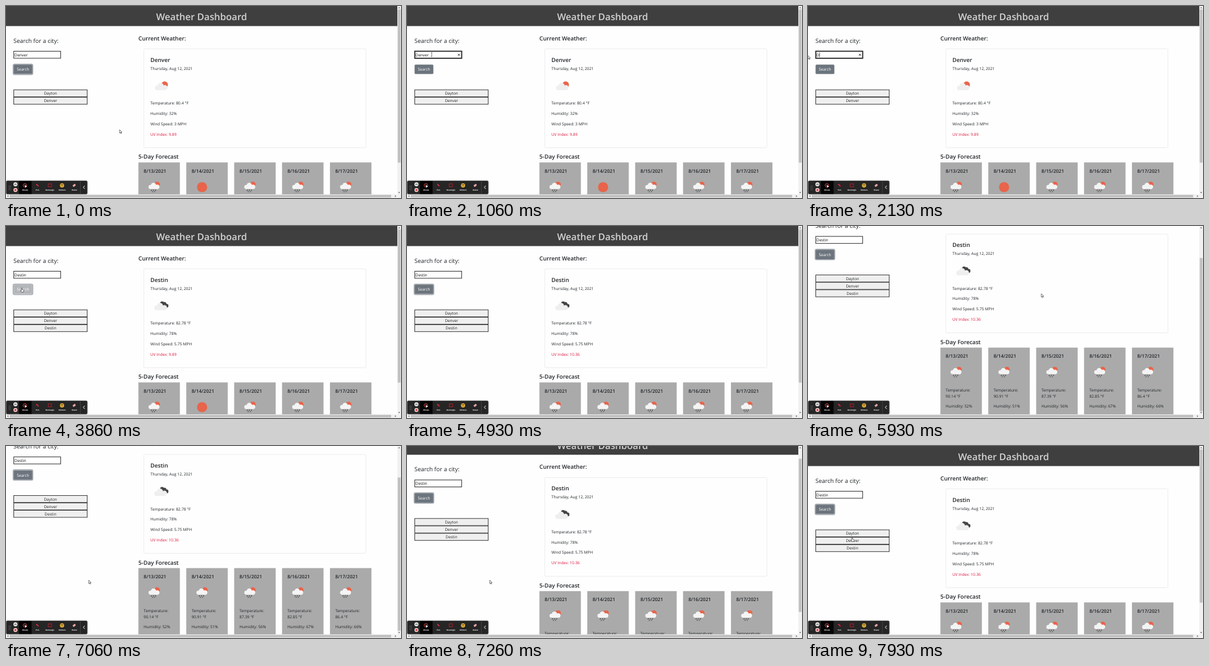
Animation, 640 px wide and 312 px high, one loop 8 s. Source, as an HTML page:

```html
<!DOCTYPE html>
<html lang="en">
<head>
<meta charset="utf-8">
<title>Weather Dashboard</title>
<style>
  html, body { margin: 0; width: 100%; height: 100%; overflow: hidden; background: #fefefe; }
  svg { display: block; width: 100%; height: 100%; }
  text {
    font: 400 6.35px "Open Sans", "Noto Sans", sans-serif;
    fill: #212529;
    text-rendering: geometricPrecision;
    white-space: pre;
  }
  .title { font-size: 15.25px; font-weight: 600; fill: #d3d3d3; }
  .head { font-size: 9.2px; font-weight: 600; }
  .label { font-size: 9.5px; }
  .day { font-size: 7.67px; font-weight: 600; }
  .mid { text-anchor: middle; }
  .uv { fill: #dc143c; }
  .tool { font-size: 2.9px; font-weight: 700; fill: #fff; text-anchor: middle; }
  .city { fill: #efefef; stroke: #2a2a2a; stroke-width: .9; }
  .arrowhead { fill: #505050; }
  .pointer { fill: #fff; stroke: #222; stroke-width: .6; stroke-linejoin: round; }
</style>
</head>
<body>
<svg viewBox="0 0 640 312" preserveAspectRatio="none">
  <defs>
    <g id="cloud">
      <circle cx="4" cy="9" r="3.8"/>
      <circle cx="9.5" cy="6" r="5"/>
      <circle cx="16.6" cy="8.6" r="4.2"/>
      <rect x="4" y="6.5" width="13" height="6.3"/>
    </g>
    <g id="partly">
      <circle cx="257" cy="128" r="5.4" fill="#e9654a"/>
      <use href="#cloud" x="241" y="124" fill="#efefef"/>
    </g>
    <g id="overcast">
      <g fill="#454547">
        <circle cx="253" cy="125.6" r="3.2"/>
        <circle cx="256.5" cy="127" r="3.4"/>
        <circle cx="260" cy="129.6" r="3.2"/>
        <rect x="252" y="127" width="8" height="5.8"/>
      </g>
      <use href="#cloud" x="240" y="124" fill="#efefef"/>
    </g>
    <g id="rain">
      <circle cx="4.6" cy="-4" r="4.6" fill="#e8644a"/>
      <use href="#cloud" transform="translate(-9.3 -7.6) scale(.86)" fill="#f4f4f4"/>
      <path d="M-3.8 4.4l-1.2 2M-.4 4.4l-1.2 2M3 4.4l-1.2 2M-2.4 7l-.8 1.4M1 7l-.8 1.4" stroke="#47474a" stroke-width="1.1" fill="none"/>
    </g>
    <circle id="sun" cx="0" cy=".4" r="8.2" fill="#e8644a"/>
  </defs>

  <g id="page">
    <rect width="634" height="32.6" fill="#3f3f3f"/>
    <text class="title mid" x="316.8" y="23">Weather Dashboard</text>

    <text class="label" x="12" y="59.6">Search for a city:</text>
    <rect id="field" x="12.6" y="73.5" width="76" height="11.4" fill="#fff" stroke="#333"/>
    <rect id="mark" y="75.4" height="7.8" fill="#3390ff"/>
    <text id="query" x="13.8" y="81.7"></text>
    <path id="caret" d="M0 75.6v7.6" stroke="#000" stroke-width=".6"/>
    <path id="clear" d="M82.6 77.8l3 3m0-3l-3 3" stroke="#222" stroke-width="1"/>

    <rect id="ring" x="11.6" y="94.4" width="31.8" height="17" rx="2.2" fill="none" stroke="#a4a9ae" stroke-width="1.5"/>
    <rect id="button" x="12.3" y="95.2" width="30.4" height="15.4" rx="1.6"/>
    <text class="mid" x="27.5" y="105.3" style="fill:#fff">Search</text>
    <g id="cities"></g>

    <text class="head" x="214.6" y="55.6">Current Weather:</text>
    <rect x="223.3" y="69.7" width="359.8" height="160.5" rx="1.7" fill="none" stroke="#e9e9e9" stroke-width=".8"/>
    <text id="name" class="head" x="234" y="90.8"></text>
    <text x="234" y="103.8">Thursday, Aug 12, 2021</text>
    <use id="sky"/>
    <text id="temp" x="234" y="160.4"></text>
    <text id="humid" x="234" y="177.1"></text>
    <text id="wind" x="234" y="193.8"></text>
    <text id="uv" class="uv" x="234" y="210.5"></text>

    <text class="head" x="214.6" y="248.4">5-Day Forecast</text>
    <g id="days"></g>
  </g>

  <!-- scrollbars -->
  <rect x="634" width="6" height="312" fill="#f1f1f1"/>
  <rect y="306" width="640" height="6" fill="#f1f1f1"/>
  <rect id="thumb" x="634.7" width="4.6" height="249" fill="#c1c1c1"/>
  <rect x="6" y="306.8" width="618" height="4.5" fill="#c1c1c1"/>
  <path class="arrowhead" d="M635.5 3.6h3l-1.5-1.8zM635.5 302.4h3l-1.5 1.8zM3.8 307.6v3l-1.8-1.5zM630.4 307.6v3l1.8-1.5z"/>

  <!-- recorder bar -->
  <rect x=".4" y="284" width="131.4" height="21.8" rx="2" fill="#262626" stroke="#4a4a4a" stroke-width=".6"/>
  <path d="M5 292v7M7 292v7" stroke="#777" stroke-width=".9" stroke-dasharray="1 1"/>
  <circle cx="15.3" cy="289.8" r="3.2" fill="#fff"/>
  <path d="M14.3 288.3v3M16.3 288.3v3" stroke="#222" stroke-width=".9"/>
  <circle cx="15.3" cy="299" r="3.2" fill="#f3d9d9"/>
  <rect x="13.7" y="297.4" width="3.2" height="3.2" rx=".5" fill="#d83a3a"/>
  <rect x="21" y="284.4" width="20.5" height="21" fill="#050505"/>
  <circle cx="30.6" cy="291.4" r="2.8" fill="none" stroke="#e04848" stroke-width="1"/>
  <path d="M30.2 290.4l4 3.2-1.9.3-.9 1.7z" fill="#fff"/>
  <path d="M49 289.4l3.6 3.4" stroke="#d92b3a" stroke-width="1.8"/>
  <rect x="68.4" y="289" width="5.4" height="4.8" fill="none" stroke="#a81f2b" stroke-width="1"/>
  <circle cx="90.8" cy="291.6" r="3.4" fill="#f2bd3c"/>
  <path d="M88.6 290.6h4.4" stroke="#5b3a10" stroke-width="1.1"/>
  <path d="M89.3 292.6q1.5 1.6 3 0" stroke="#5b3a10" stroke-width=".7" fill="none"/>
  <path d="M108.6 293l3.8-3" stroke="#e8a3a8" stroke-width="3"/>
  <g id="tools"></g>
  <path d="M120.6 285v20" stroke="#555" stroke-width=".6"/>
  <path d="M127.6 292l-2.4 2.6 2.4 2.6" stroke="#fff" stroke-width="1" fill="none"/>

  <g id="cursor">
    <path id="arrow" class="pointer" d="M0 0v5.6l1.3-1.2.9 2 .9-.4-.9-1.9h1.8z"/>
    <path id="hand" class="pointer" d="M-.6 0q.6-.7 1.2 0v2.2l2.2.6q.6.2.5.9l-.5 2.6h-3.2l-1.8-2.4q.2-.8 1.6.2z"/>
    <path id="beam" d="M-1-3h2M0-3v6M-1 3h2" stroke="#222" stroke-width=".6" fill="none"/>
  </g>
</svg>

<script>
const LOOP = 8000;
const $ = id => document.getElementById(id);
const show = (id, on) => $(id).setAttribute("visibility", on ? "visible" : "hidden");
const set = (id, attr, value) => $(id).setAttribute(attr, value);
const write = (id, text) => { if ($(id).textContent !== text) $(id).textContent = text; };

const reports = {
  Denver: { sky: "#partly", temp: "80.4", humid: 32, wind: "3" },
  Destin: { sky: "#overcast", temp: "82.78", humid: 78, wind: "5.75" }
};
const forecast = [["90.14", 52], ["90.91", 51], ["87.39", 56], ["82.85", 67], ["86.4", 66]];

$("cities").innerHTML = ["Dayton", "Denver", "Destin"].map((city, i) => `
  <g id="city${i}" transform="translate(0 ${i * 12.05})">
    <rect class="city" x="12.6" y="136.2" width="119" height="11.4"/>
    <text class="mid" x="72.1" y="144.4">${city}</text>
  </g>`).join("");

$("days").innerHTML = forecast.map(([temp, humid], i) => `
  <g transform="translate(${214.5 + i * 77.6} 0)">
    <rect y="254.2" width="67.2" height="130" fill="#aaa"/>
    <text class="day" x="8.6" y="270.6">8/${13 + i}/2021</text>
    <use id="icon${i}" href="#rain" x="25.6" y="294"/>
    <text x="8.6" y="325.4">Temperature:</text>
    <text x="8.6" y="335.3">${temp} °F</text>
    <text x="8.6" y="352">Humidity: ${humid}%</text>
  </g>`).join("");

$("tools").innerHTML = ["Mouse", "Pen", "Rectangle", "Stickers", "Eraser"].map((name, i) =>
  `<text class="tool" x="${31 + i * 20}" y="300.2">${name}</text>`).join("");

// time, x, y of the pointer
const path = [
  [0, 184, 201], [60, 184, 201], [800, 40, 79], [1060, 40, 79], [1400, 0, 80.5],
  [3260, 0, 80.5], [3600, 25.5, 101], [4260, 25.5, 101], [4800, 378, 110],
  [5930, 378, 110], [6730, 134, 218], [7600, 134, 218], [7900, 71.5, 149], [8000, 71.5, 149]
];

const smooth = (t, a, b) => {
  const k = Math.min(1, Math.max(0, (t - a) / (b - a)));
  return k * k * (3 - 2 * k);
};

function pointerAt(t) {
  const i = path.findIndex(p => p[0] > t);
  const [a, b] = [path[i - 1], path[i]];
  const k = smooth(t, a[0], b[0]);
  return [a[1] + (b[1] - a[1]) * k, a[2] + (b[2] - a[2]) * k];
}

function render(t) {
  const scroll = 56.6 * (smooth(t, 5060, 5460) - smooth(t, 7035, 7400));
  set("page", "transform", `translate(0 ${-scroll})`);
  set("thumb", "y", 5.5 + scroll * 0.82);

  const focus = t >= 830 && t < 3660;
  const typed = t < 2130 ? 0 : t < 2330 ? 1 : Math.min(6, 2 + Math.floor((t - 2330) / 100));
  const selecting = t >= 1060 && t < 2130;
  write("query", typed ? "Destin".slice(0, typed) : "Denver");
  const width = $("query").getComputedTextLength();
  const [x, y] = pointerAt(t);
  const from = Math.min(width, Math.max(0, x - 13.8));
  show("mark", selecting);
  set("mark", "x", 13.8 + from);
  set("mark", "width", width - from);
  $("query").style.fill = selecting && from < width / 2 ? "#fff" : "#111";
  show("caret", focus && !selecting);
  set("caret", "transform", `translate(${14.2 + width} 0)`);
  show("clear", focus);
  set("field", "stroke", focus ? "#222" : "#333");
  set("field", "stroke-width", focus ? 1.7 : 1);

  const pressed = t >= 3700 && t < 4060;
  show("ring", !focus);
  set("button", "fill", pressed ? "#b3b6b9" : "#6c757d");

  const city = t < 3760 ? "Denver" : "Destin";
  const now = reports[city];
  const updated = t >= 3930;
  show("city2", t >= 3730);
  write("name", city);
  set("sky", "href", now.sky);
  write("temp", `Temperature: ${now.temp} °F`);
  write("humid", `Humidity: ${now.humid}%`);
  write("wind", `Wind Speed: ${now.wind} MPH`);
  write("uv", `UV Index: ${updated ? "10.36" : "9.89"}`);
  set("icon1", "href", updated ? "#rain" : "#sun");

  const top = y + scroll;
  const overField = x > 12 && x < 89 && top > 73 && top < 85;
  const overButton = x > 12 && x < 43 && top > 95 && top < 111;
  const overCity = x > 12 && x < 132 && top > 136 && top < 172;
  const hand = overButton || overCity;
  const visible = t < 4830 || t >= 5060;
  set("cursor", "transform", `translate(${x} ${y})`);
  show("arrow", visible && !hand && !overField);
  show("hand", visible && hand);
  show("beam", visible && overField);
}

function tick() {
  render(performance.now() % LOOP);
  requestAnimationFrame(tick);
}
tick();
</script>
</body>
</html>
```
